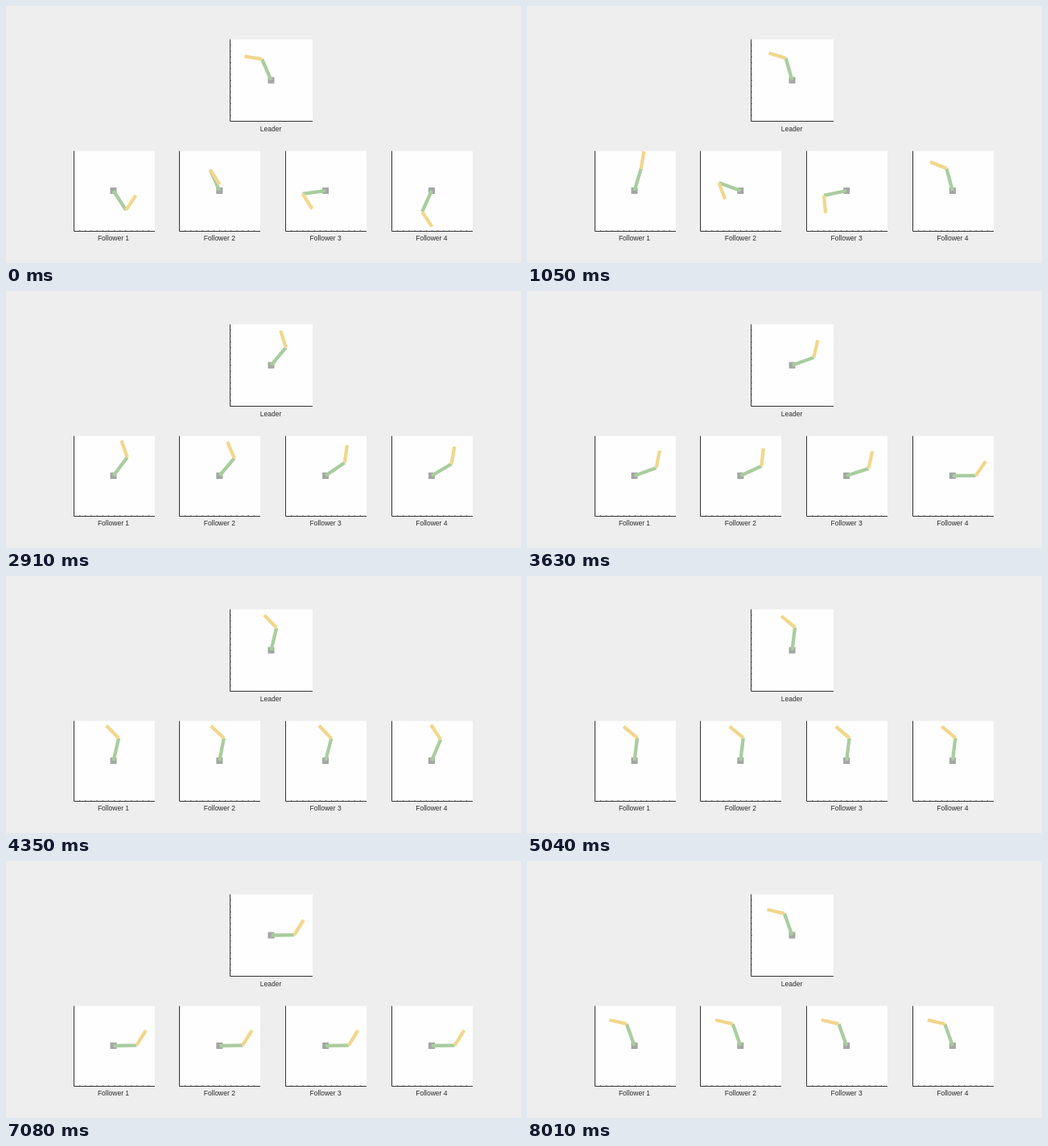
An HTML page for the animation above (8.04 s loop, 640 px wide and 320 px high).

```html
<!DOCTYPE html>
<html>
<head>
<meta charset="utf-8">
<style>
html, body { margin: 0; width: 640px; height: 320px; overflow: hidden; background: #eee; }
svg { display: block; }
text { font: 8.5px "Liberation Sans", Arial, sans-serif; fill: #2b2b2b; text-anchor: middle; }
</style>
</head>
<body>
<svg id="stage" width="640" height="320"></svg>
<script>
const LOOP = 8040, STEP = 30, RAD = Math.PI / 180, TURN = 2 * Math.PI;
const UPPER = 28.7, FORE = 22;
const times = [0, 1050, 2130, 3630, 5040, 6060, 8010];

// Phase of the leader's swing at each of the times
const phase = [-0.2, TURN - 0.555, 2 * TURN - 0.2, 3 * TURN + 2.278,
               4 * TURN + 1.105, 4 * TURN + 5.178, 6 * TURN + 0.42];

// Shoulder and elbow offsets from the leader, in degrees, shrinking to zero
const arms = [
  { name: 'Leader', x: 329.5, y: 92.5, half: 51, shoulder: [], elbow: [] },
  { name: 'Follower 1', shoulder: [-170.5, -32.7, 6.5, 0], elbow: [56, -50, -3.6, 0.7] },
  { name: 'Follower 2', shoulder: [0.5, 53.5, -6, 4.8], elbow: [-229, 74, 11, 1.3] },
  { name: 'Follower 3', shoulder: [-285.5, -274, -31.5, -2], elbow: [57, 26, -23, 2] },
  { name: 'Follower 4', shoulder: [-227.5, -0.7, -19.5, -20], elbow: [0, -5, -13, -2] }
];

const stage = document.getElementById('stage');
function add(tag, attrs) {
  const el = document.createElementNS('http://www.w3.org/2000/svg', tag);
  for (const k in attrs) el.setAttribute(k, attrs[k]);
  return stage.appendChild(el);
}

arms.forEach((arm, i) => {
  if (i) Object.assign(arm, { x: 133.5 + (i - 1) * 131.8, y: 230, half: 50 });
  const { x, y, half } = arm;
  const left = Math.round(x - half) + 0.5 - (i ? 0 : 1), bottom = Math.floor(y + half) + 0.5;
  const top = bottom - 2 * half;
  add('rect', { x: left, y: top, width: 2 * half + 0.5, height: 2 * half, fill: '#fefefe' });
  let ticks = '';
  for (let k = 1; k < 14; k++) {
    const d = k * half / 7;
    ticks += i ? `M${left + d} ${bottom}v-1.5` : `M${left} ${bottom - d}h1.5`;
  }
  add('path', { d: ticks, stroke: '#555', 'stroke-width': 0.7 });
  add('path', { d: `M${left} ${top}V${bottom}H${left + 2 * half + 0.5}`, fill: 'none', stroke: '#333' });
  add('rect', { x: x - 4, y: y - 4, width: 8, height: 8, fill: '#a4a6a4' });
  arm.upper = add('line', { x1: x, y1: y, stroke: '#a9cd9e', 'stroke-width': 4.3 });
  arm.fore = add('line', { stroke: '#f1d78c', 'stroke-width': 4.3 });
  add('text', { x: x - (i ? 0 : 0.5), y: i ? 292 : 156 }).textContent = arm.name;
});

function segment(t) {
  let i = 0;
  while (i < times.length - 2 && t >= times[i + 1]) i++;
  return [i, (t - times[i]) / (times[i + 1] - times[i])];
}

// Cubic through the phase points with slopes from their neighbours
function swing(t) {
  const [i, u] = segment(t), last = times.length - 1;
  const slope = k => {
    const a = Math.max(k - 1, 0), b = Math.min(k + 1, last);
    return (phase[b] - phase[a]) / (times[b] - times[a]);
  };
  const h = times[i + 1] - times[i], v = 1 - u;
  return phase[i] * v * v * (1 + 2 * u) + phase[i + 1] * u * u * (3 - 2 * u)
    + h * u * v * (v * slope(i) - u * slope(i + 1));
}

function offset(list, t) {
  const [i, u] = segment(t), a = list[i] || 0, b = list[i + 1] || 0;
  return (a + (b - a) * u * u * (3 - 2 * u)) * RAD;
}

function link(el, x, y, angle, length) {
  const x2 = x + length * Math.cos(angle), y2 = y - length * Math.sin(angle);
  el.setAttribute('x1', x);
  el.setAttribute('y1', y);
  el.setAttribute('x2', x2);
  el.setAttribute('y2', y2);
  return [x2, y2];
}

function draw(now) {
  const t = Math.floor(now % LOOP / STEP) * STEP;
  const lead = 1 + Math.cos(swing(t));
  for (const arm of arms) {
    const a = lead + offset(arm.shoulder, t), b = a + 1 + offset(arm.elbow, t);
    const [ex, ey] = link(arm.upper, arm.x, arm.y, a, UPPER);
    link(arm.fore, ex, ey, b, FORE);
  }
}

const start = performance.now();
function tick() {
  draw(performance.now() - start);
  requestAnimationFrame(tick);
}
tick();
</script>
</body>
</html>
```
